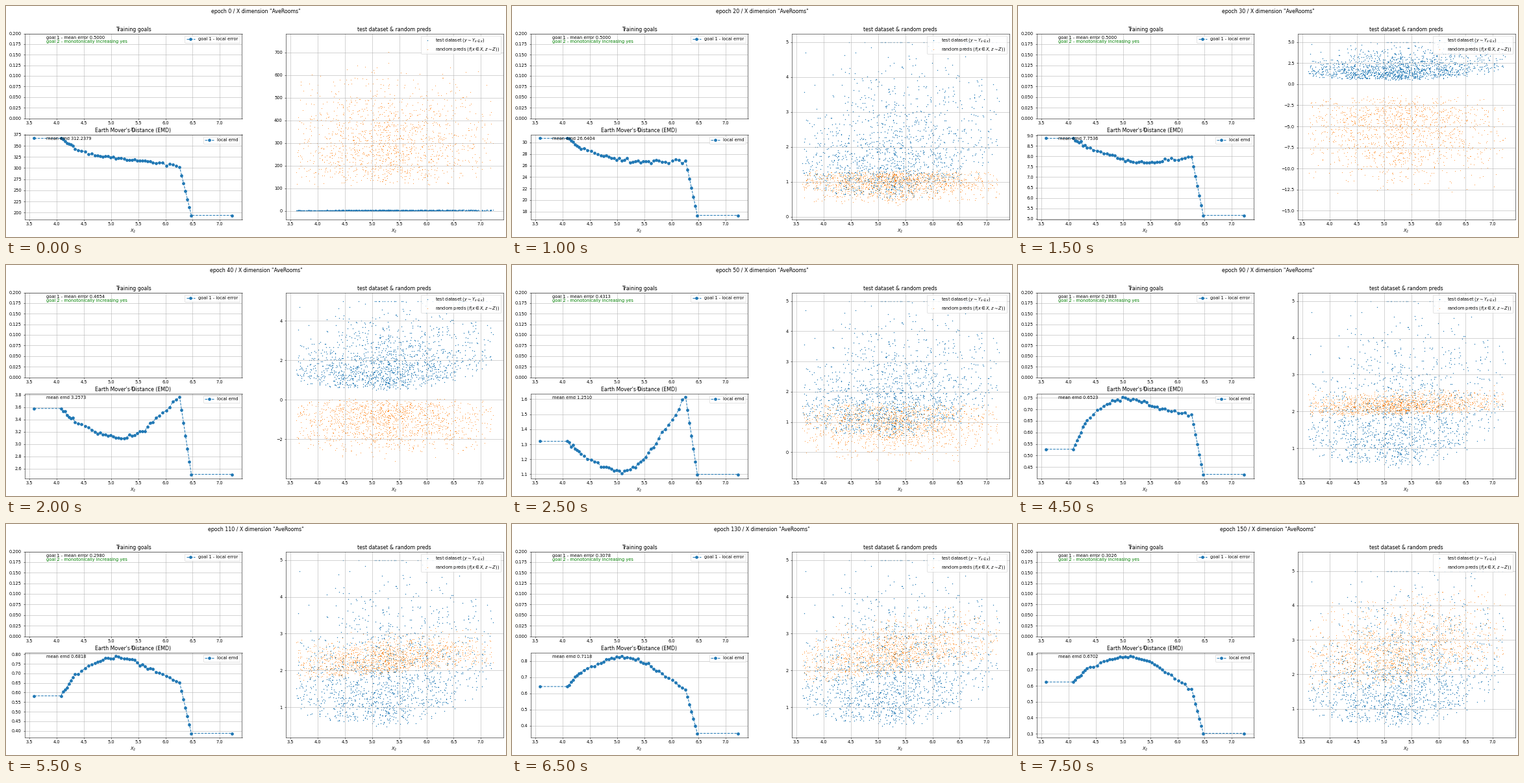
These frames come from a looping animation (770 by 357 pixels, 8 s). A matplotlib script:

```python
import numpy as np
import matplotlib.pyplot as plt
from matplotlib.animation import FuncAnimation

W, H, DPI = 770, 357, 48
STEP = 10            # epochs per frame
FRAMES, INTERVAL = 16, 500

plt.rcParams.update({"font.family": "DejaVu Sans", "font.size": 9.9,
                     "axes.titlepad": 5})

# epoch: mean error, mean emd, predictions (near edge, far edge),
#        emd curve relative to its mean (start, end, arch, skew, tail)
STATES = {
    0: (.5, 312.2379, 104, 746, 1.175, .967, -.04, -.02, .621),
    30: (.5, 7.7536, -1.2, -15, 1.143, 1.028, -.08, 0, .666),
    50: (.4313, 1.2510, 1.65, -.58, 1.055, 1.289, -.27, .03, .879),
    70: (.2856, .6276, 1.45, 2.1, .746, 1.322, -.03, .05, .884),
    90: (.2883, .6523, 1.9, 2.75, .808, 1.041, .22, .05, .641),
    130: (.3078, .7118, 1.9, 3.8, .902, .874, .27, 0, .495),
    150: (.3026, .6702, 1.7, 4.88, .931, .865, .27, 0, .451),
}


def state(epoch):
    """Blend neighbouring states; asinh keeps huge and tiny values in step."""
    columns = np.arcsinh(list(STATES.values())).T
    return np.sinh([np.interp(epoch, list(STATES), c) for c in columns])


def panel(left, top, right, bottom, title):
    """Axes placed by pixel edges, measured from the top left."""
    ax = fig.add_axes([left / W, 1 - bottom / H, (right - left) / W, (bottom - top) / H])
    ax.set_title(title)
    ax.set_xlabel("$X_2$")
    ax.set_xlim(3.408, 7.409)
    ax.grid(True)
    return ax


def note(ax, height, text="", **style):
    return ax.text(.1, height, text, transform=ax.transAxes, **style)


def fit(ax, lo, hi):
    pad = .05 * (hi - lo)
    ax.set_ylim(lo - pad, hi + pad)


# window centres along x; the curve arches over 1..44, then drops until 50
FIRST, LAST, DROP, COUNT = 1, 44, 50, 52
index = np.arange(COUNT)
bins = np.interp(index, [0, FIRST, 8, 14, 36, LAST, DROP, 51],
                 [3.587, 4.078, 4.335, 4.706, 5.765, 6.262, 6.477, 7.225])


def emd_curve(epoch, start, end, arch, skew, tail):
    u = np.clip((index - FIRST) / (LAST - FIRST), 0, 1)
    fall = np.clip((index - LAST) / (DROP - LAST), 0, 1)
    curve = (start + (end - start) * u + arch * np.sin(np.pi * u)
             + skew * np.sin(2 * np.pi * u) + (tail - end) * fall)
    jitter = np.random.default_rng(epoch).normal(0, .006, COUNT)
    return curve + jitter * ((u > 0) & (u < 1))


# test dataset
rng = np.random.default_rng(7)
x = rng.normal(5.35, .98, 1800)
x = x[(x > 3.59) & (x < 7.23)][:1400]
off = x - 5.3
y = np.minimum(.42 + .22 * (x - 5.1) ** 2 + rng.gamma(1.9, .78 + .1 * off), 5)
Y_MIN, Y_MAX = .42, 5

fig = plt.figure(figsize=(W / DPI, H / DPI), dpi=DPI, facecolor="white")
heading = fig.suptitle("", y=.99)

goals = panel(28.5, 42.5, 363.5, 173.5, "Training goals")
goals.set_ylim(0, .2)
goals.plot([], [], "--o", label="goal 1 - local error")
error_text = note(goals, .937)
note(goals, .887, "goal 2 - monotonically increasing yes", color="green")

dist = panel(28.5, 198.5, 363.5, 329.5, "Earth Mover's Distance (EMD)")
emd_line, = dist.plot(bins, bins, "--o", label="local emd")
emd_text = note(dist, .937)

data = panel(430.5, 42.5, 765.5, 329.5, "test dataset & random preds")
data.scatter(x, y, s=4.2, lw=0, color="C0", label=r"test dataset ($y \sim Y_{x \in x}$)")
dots = data.scatter(x, y, s=2.3, lw=0, color="C1",
                    label=r"random preds ($f(x \in X, z \sim Z)$)")

for ax in (goals, dist, data):
    ax.legend(loc="upper right")


def draw(i):
    epoch = i * STEP
    error, mean_emd, near, far, *shape = state(epoch)
    heading.set_text(f'epoch {epoch} / X dimension "AveRooms"')
    error_text.set_text(f"goal 1 - mean error {error:.4f}")
    emd_text.set_text(f"mean emd {mean_emd:.4f}")

    emd = mean_emd * emd_curve(epoch, *shape)
    emd_line.set_ydata(emd)
    fit(dist, emd.min(), emd.max())

    # late in training the predictions start to follow x
    tilt = .2 * np.clip((epoch - 80) / 50, 0, 1)
    z = np.random.default_rng(100 + epoch).beta(2, 4, x.size)
    dots.set_offsets(np.column_stack([x, near + (far - near) * z + tilt * off]))
    fit(data, min(Y_MIN, near, far), max(Y_MAX, near, far + 2.2 * tilt))
    return heading, error_text, emd_text, emd_line, dots


anim = FuncAnimation(fig, draw, frames=FRAMES, interval=INTERVAL,
                     init_func=lambda: draw(0), repeat=True, repeat_delay=0, blit=False)
plt.show()
```
